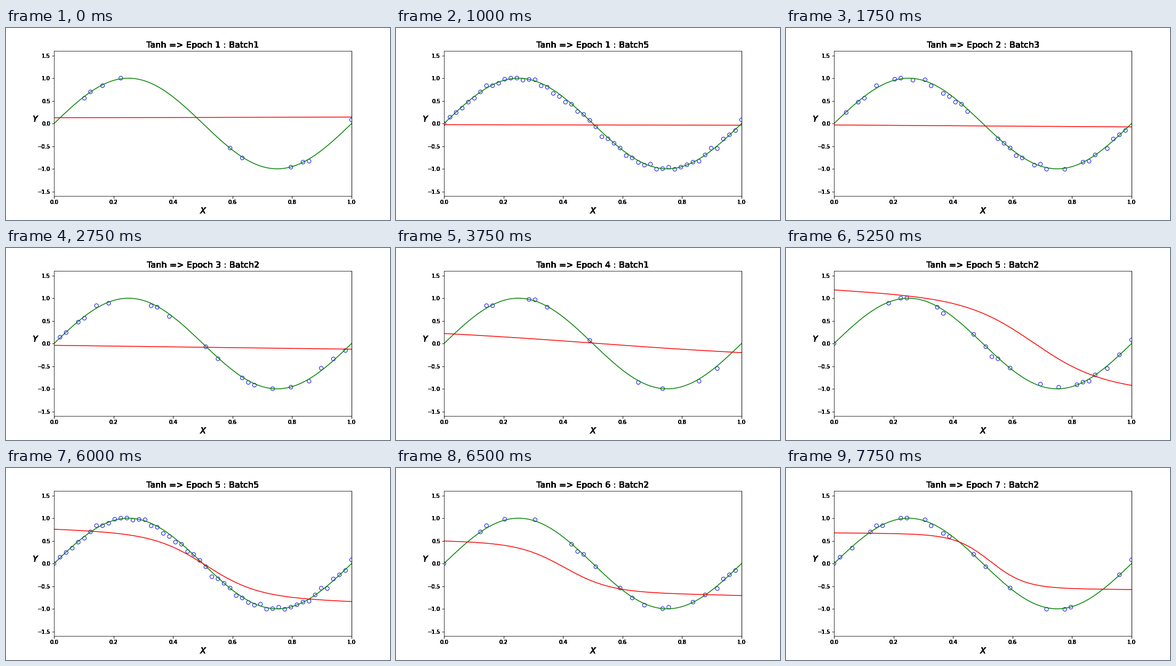
A matplotlib script for the animation above (8000 ms loop, 720 by 360 pixels).

```python
import matplotlib.pyplot as plt
import numpy as np
from matplotlib.animation import FuncAnimation

FRAMES, INTERVAL = 32, 250
BATCHES, BATCH_SIZE, POINTS = 5, 10, 50
EPOCHS = -(-FRAMES // BATCHES)

# step: (offset, amplitude, steepness, centre, tilt) of the fitted curve
KEYS = {
    0: (.1345, 0, 2, .5, -.015),
    4: (-.032, 0, 2, .5, .012),
    11: (-.0825, 0, 2, .5, .085),
    15: (.01, .12, 2, .5, .24),
    19: (-.3, .75, 3, .55, .63),
    21: (.02, .9, 4.5, .67, .4),
    26: (-.088, .53, 6.5, .405, .15),
    31: (.0495, .596, 8.4, .525, .06),
}


def wave(x):
    return np.sin(2 * np.pi * x)


def prediction(step, x):
    """Tilted tanh whose parameters move between the key steps."""
    offset, amp, steep, centre, tilt = (
        np.interp(step, list(KEYS), track) for track in zip(*KEYS.values()))
    d = x - centre
    return offset - amp * np.tanh(steep * d) - tilt * d


def heavy(artist, passes=20):
    """Draw an artist several times so its soft edges turn dark."""
    draw = artist.draw

    def draw_all(renderer):
        for _ in range(passes):
            draw(renderer)

    artist.draw = draw_all


# Noisy samples, reshuffled for every epoch
rng = np.random.default_rng(7)
sample_x = np.linspace(0, 1, POINTS)
sample_y = wave(sample_x) + rng.normal(0, .04, POINTS)
orders = [rng.permutation(POINTS) for _ in range(EPOCHS)]

plt.rcParams["font.family"] = "DejaVu Sans"
fig = plt.figure(figsize=(10, 5), dpi=72, facecolor="white")
fig.subplots_adjust(left=.125, right=.9, bottom=.125, top=.88)
ax = fig.add_subplot()
ax.set_xlim(0, 1)
ax.set_ylim(-1.6, 1.6)
ax.set_xticks(np.linspace(0, 1, 6))
ax.set_yticks(np.linspace(-1.5, 1.5, 7))
ax.set_xlabel("X", fontsize=16, style="italic")
ax.set_ylabel("Y", fontsize=16, style="italic", rotation=0)
title = ax.set_title("", fontsize=16)

for part in (title, ax.xaxis.label, ax.yaxis.label, ax.spines["right"]):
    heavy(part)
for tick in ax.xaxis.get_major_ticks() + ax.yaxis.get_major_ticks():
    heavy(tick.label1)
    heavy(tick.tick1line)

grid = np.linspace(0, 1, 300)
dots = ax.scatter([], [], s=50, facecolors="none", edgecolors="b", linewidths=1)
ax.plot(grid, wave(grid), color="g", lw=1.5)
curve, = ax.plot([], [], color="r", lw=1.5)


def update(step):
    epoch, batch = divmod(step, BATCHES)
    shown = orders[epoch][:(batch + 1) * BATCH_SIZE]
    dots.set_offsets(np.column_stack([sample_x[shown], sample_y[shown]]))
    curve.set_data(grid, prediction(step, grid))
    title.set_text(f"Tanh => Epoch {epoch + 1} : Batch{batch + 1}")
    return dots, curve, title


anim = FuncAnimation(fig, update, frames=FRAMES, interval=INTERVAL,
                     repeat=True, repeat_delay=0)
plt.show()
```
